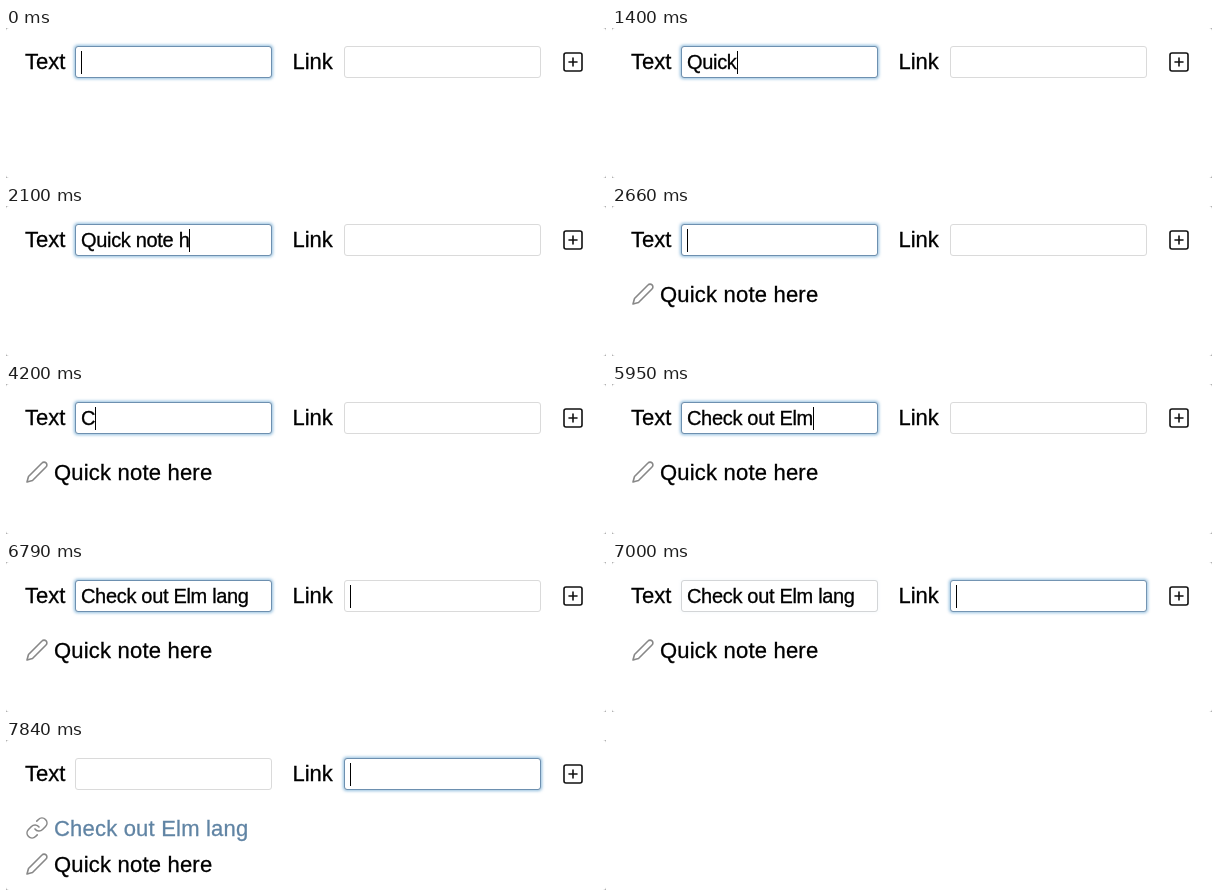
Write an HTML page that moves like this. It is 600 px wide and 150 px high and loops after 8 s.

```html
<!DOCTYPE html>
<html lang="en">
<head>
<meta charset="utf-8">
<title>Adding notes and links</title>
<style>
  html, body { margin: 0; width: 100%; height: 100%; overflow: hidden; background: #aaa; }
  svg { display: block; }
  text { font: 22px "Liberation Sans", Arial, sans-serif; white-space: pre; stroke: currentColor; stroke-width: .3; fill: currentColor; }
  .value { font-size: 20px; letter-spacing: -.32px; }
  .row text { letter-spacing: .2px; }
  .icon { fill: none; stroke: #888; stroke-width: 1.6; stroke-linecap: round; stroke-linejoin: round; }
  .plus { stroke: #111; }
  .glow { fill: none; stroke: #8dbbdc; stroke-width: 3; filter: blur(1.6px); }
  .box { fill: #fff; stroke: #dadada; }
  .focus { fill: none; stroke: #6d90b0; }
</style>
</head>
<body>
<svg width="600" height="150" viewBox="0 0 600 150">
  <defs>
    <rect id="frame" x=".5" y="18.5" width="196" height="31" rx="2.5"/>
    <clipPath id="inner"><rect x="5" y="19" width="190" height="30"/></clipPath>
  </defs>
  <rect width="600" height="150" rx="3" fill="#fff"/>
  <text x="19" y="41">Text</text>
  <text x="286.5" y="41">Link</text>
  <g id="fields"></g>
  <g class="icon plus" transform="translate(555 22)">
    <rect x="3" y="3" width="18" height="18" rx="2"/>
    <path d="M12 8v8M8 12h8"/>
  </g>
  <g class="row" id="link" transform="translate(19 76)">
    <path class="icon" d="M10 13a5 5 0 0 0 7.54.54l3-3a5 5 0 0 0-7.07-7.07l-1.72 1.71M14 11a5 5 0 0 0-7.54-.54l-3 3a5 5 0 0 0 7.07 7.07l1.71-1.71"/>
    <text x="29" y="20" color="#6084a4">Check out Elm lang</text>
  </g>
  <g class="row" id="note">
    <path class="icon" d="M17 3a2.83 2.83 0 1 1 4 4L7.5 20.5 2 22l1.5-5.5L17 3z"/>
    <text x="29" y="20">Quick note here</text>
  </g>
</svg>
<script>
const LOOP = 8000, STEP = 70;
const SUBMIT_NOTE = 2660, TAB = 6790, PASTE = 7070, SUBMIT_LINK = 7840;
const URL_TEXT = "https://www.elm-lang.org";

// Each phrase with the moments its keys are pressed
const phrases = [
  { text: "Quick note here", end: SUBMIT_NOTE,
    keys: [770, 910, 1050, 1260, 1400, 1470, 1610, 1680, 1750, 1890, 1960, 2100, 2170, 2170, 2310] },
  { text: "Check out Elm lang", end: SUBMIT_LINK,
    keys: [4200, 4340, 4480, 4620, 4760, 5040, 5110, 5180, 5320, 5390,
           5670, 5810, 5950, 6020, 6160, 6300, 6440, 6510] }
];
const caretOff = [[70, 630], [3150, 3710], [7560, SUBMIT_LINK]];

const $ = id => document.getElementById(id);

function makeField(x) {
  const g = document.createElementNS("http://www.w3.org/2000/svg", "g");
  g.setAttribute("transform", `translate(${x} 0)`);
  g.innerHTML = `<use href="#frame" class="glow"/><use href="#frame" class="box"/>
    <use href="#frame" class="focus"/>
    <g clip-path="url(#inner)"><text class="value" y="41"></text></g>
    <rect class="caret" y="23" width="1" height="23"/>`;
  $("fields").append(g);
  const [glow, focus, value, caret] =
    [".glow", ".focus", ".value", ".caret"].map(s => g.querySelector(s));

  return (text, focused, showCaret) => {
    glow.style.opacity = focus.style.opacity = focused;
    value.textContent = text;
    const width = text ? value.getComputedTextLength() : 0;
    const end = Math.min(6 + width, 194);   // long values scroll left
    value.setAttribute("x", end - width);
    caret.setAttribute("x", Math.round(end));
    caret.style.opacity = showCaret ? 1 : 0;
  };
}

const drawText = makeField(69), drawLink = makeField(338);

function typed(t) {
  const phrase = phrases.find(p => t < p.end);
  return phrase ? phrase.text.slice(0, phrase.keys.filter(k => k <= t).length) : "";
}

function draw(t) {
  const p = Math.min(1, Math.max(0, (t - TAB) / (PASTE - TAB)));
  const focus = 1 - (1 - p) ** 2;
  const blinkOn = !caretOff.some(([from, to]) => t >= from && t < to);
  const url = t >= PASTE && t < SUBMIT_LINK ? URL_TEXT : "";
  drawText(typed(t), 1 - focus, blinkOn && t < TAB);
  drawLink(url, focus, blinkOn && t >= TAB);

  const linked = t >= SUBMIT_LINK;
  $("note").style.display = t >= SUBMIT_NOTE ? "" : "none";
  $("note").setAttribute("transform", `translate(19 ${linked ? 112 : 76})`);
  $("link").style.display = linked ? "" : "none";
}

const start = performance.now();
function tick() {
  const t = (performance.now() - start) % LOOP;
  draw(Math.floor(t / STEP) * STEP);
  requestAnimationFrame(tick);
}
tick();
</script>
</body>
</html>
```
